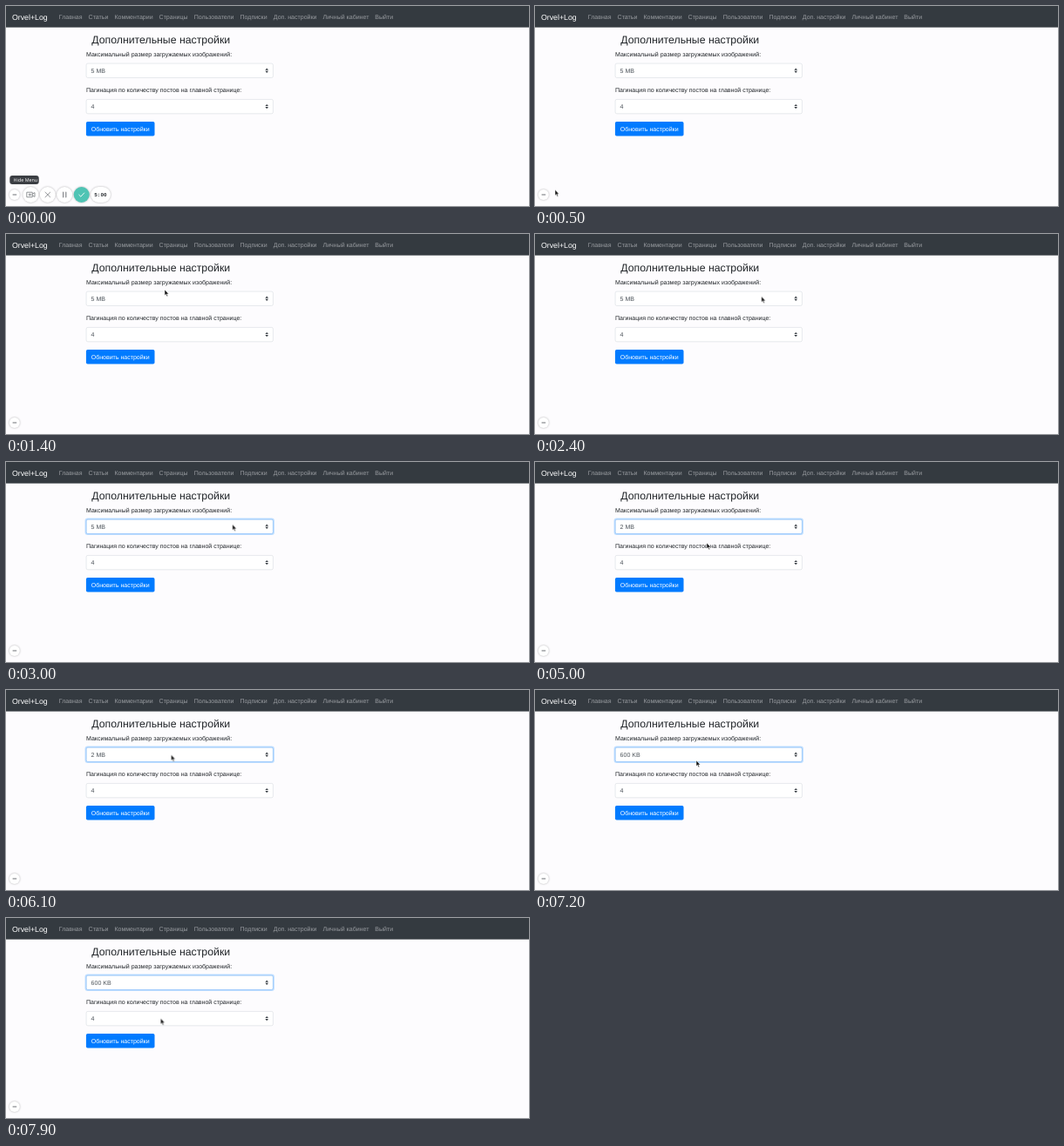
An HTML page that plays this animation: 600 by 230 pixels, repeating every 8 s.

```html
<!DOCTYPE html>
<html lang="ru">
<head>
<meta charset="utf-8">
<title>Дополнительные настройки</title>
<style>
  html, body { margin: 0; width: 100%; height: 100%; overflow: hidden; background: #fdfcfe; }
  svg { display: block; width: 100%; height: 100%; }
  text { font: 7.03px "Liberation Sans", Arial, sans-serif; fill: #212529; text-rendering: geometricPrecision; }
  .brand { font-size: 8.78px; fill: #fff; }
  .nav text { fill: #999ca0; }
  .title { font-size: 12.3px; }
  .field { fill: #fff; stroke: #ced4da; stroke-width: .5; }
  .value { fill: #495057; }
  .light { fill: #fff; }

  .loop, .menu, .cursor { animation: 8s step-end infinite; }
  .menu { animation-name: collapse; }
  .cursor { animation-name: travel; }
  .focus { animation-name: focus; }
  .v1 { animation-name: v1; }
  .v2 { animation-name: v2; }
  .v3 { animation-name: v3; }
  .v4 { animation-name: v4; }

  .round { fill: #fff; filter: drop-shadow(0 .6px 1px rgba(0, 0, 0, .3)); }
  .done { fill: #4fc4b4; }
  .icon { fill: none; stroke: #85888c; stroke-width: .9; stroke-linecap: round; stroke-linejoin: round; }
  .tip { font: 5.4px "Open Sans", "Noto Sans", sans-serif; fill: #fff; }
  .timer { font: bold 6px "Liberation Mono", monospace; fill: #33373b; }

  @keyframes collapse {
    0% { opacity: 1; transform: none; animation-timing-function: steps(4, end); }
    5%, 100% { opacity: 0; transform: translateX(-28px); }
  }
  @keyframes focus {
    0% { opacity: 0; }
    31.25% { opacity: .6; }
    32.5%, 100% { opacity: 1; }
  }
  @keyframes v1 { 0% { opacity: 1; } 43.75%, 100% { opacity: 0; } }
  @keyframes v2 { 0% { opacity: 0; } 43.75% { opacity: 1; } 60%, 100% { opacity: 0; } }
  @keyframes v3 { 0% { opacity: 0; } 60% { opacity: 1; } 90%, 100% { opacity: 0; } }
  @keyframes v4 { 0% { opacity: 0; } 90%, 100% { opacity: 1; } }

  /* Each leg advances once per 100 ms */
  @keyframes travel {
    0% { transform: translate(12px, 214px); opacity: 0; }
    5% { transform: translate(18px, 213px); opacity: 1; }
    6.25% { transform: translate(23px, 211.3px); opacity: 1; animation-timing-function: steps(4, end); }
    11.25% { transform: translate(130px, 193px); animation-timing-function: steps(5, end); }
    17.5% { transform: translate(182px, 64px); animation-timing-function: steps(4, end); }
    22.5% { transform: translate(235px, 67px); animation-timing-function: steps(6, end); }
    30%, 40% { transform: translate(259.7px, 71.7px); animation-timing-function: steps(2, end); }
    42.5% { transform: translate(236px, 84px); }
    43.75%, 55% { transform: translate(213.6px, 71.5px); animation-timing-function: steps(4, end); }
    60%, 71.25% { transform: translate(197px, 93px); animation-timing-function: steps(4, end); }
    76.25%, 86.25% { transform: translate(189.5px, 74.5px); animation-timing-function: steps(3, end); }
    90%, 91.25% { transform: translate(185px, 81px); animation-timing-function: steps(6, end); }
    98.75%, 100% { transform: translate(177.4px, 115.4px); opacity: 1; }
  }
</style>
</head>
<body>
<svg viewBox="0 0 600 230" preserveAspectRatio="none">
  <defs>
    <g id="carets" fill="#343a40">
      <path d="M-1.8-.5 0-2.7 1.8-.5Z"/>
      <path d="M-1.8 .5 0 2.7 1.8 .5Z"/>
    </g>
  </defs>

  <rect width="600" height="24.6" fill="#343a40"/>
  <text class="brand" x="7" y="15.5">Orvel+Log</text>
  <g class="nav">
    <text x="60.8" y="14.7">Главная</text>
    <text x="94.6" y="14.7">Статьи</text>
    <text x="124.4" y="14.7">Комментарии</text>
    <text x="175.6" y="14.7">Страницы</text>
    <text x="215.7" y="14.7">Пользователи</text>
    <text x="268.5" y="14.7">Подписки</text>
    <text x="306.8" y="14.7">Доп. настройки</text>
    <text x="363.6" y="14.7">Личный кабинет</text>
    <text x="423.3" y="14.7">Выйти</text>
  </g>

  <text class="title" x="98.2" y="43.2">Дополнительные настройки</text>
  <text x="92" y="57.5">Максимальный размер загружаемых изображений:</text>
  <rect class="field" x="92.1" y="66.1" width="214.3" height="16.4" rx="1.8"/>
  <g class="loop focus">
    <rect x="91.3" y="65.3" width="215.9" height="18" rx="2.5" fill="none" stroke="#bfdeff" stroke-width="1.5"/>
    <rect x="92.1" y="66.1" width="214.3" height="16.4" rx="1.8" fill="none" stroke="#80bdff" stroke-width=".6"/>
  </g>
  <text class="value loop v1" x="97.6" y="76.8">5 MB</text>
  <text class="value loop v2" x="97.6" y="76.8">1 MB</text>
  <text class="value loop v3" x="97.6" y="76.8">2 MB</text>
  <text class="value loop v4" x="97.6" y="76.8">600 KB</text>
  <use href="#carets" x="299.2" y="74.3"/>

  <text x="92" y="98.9">Пагинация по количеству постов на главной странице:</text>
  <rect class="field" x="92.1" y="107.4" width="214.3" height="16.4" rx="1.8"/>
  <text class="value" x="97.6" y="118.1">4</text>
  <use href="#carets" x="299.2" y="115.6"/>

  <rect x="91.9" y="132.9" width="78.6" height="16.7" rx="1.8" fill="#007bff"/>
  <text class="light" x="97.7" y="143.7">Обновить настройки</text>

  <g class="menu">
    <rect x="4.3" y="195" width="33.4" height="10" rx="3" fill="#3b3e43"/>
    <text class="tip" x="8.6" y="202">Hide Menu</text>
    <circle class="round" cx="28.4" cy="217" r="9"/>
    <circle class="round" cx="47.8" cy="217" r="9"/>
    <circle class="round" cx="67.2" cy="217" r="9"/>
    <circle class="round done" cx="86.7" cy="217" r="9"/>
    <rect class="round" x="97.2" y="208" width="22.8" height="18" rx="9"/>
    <g class="icon">
      <path d="M24.2 214.2h6v5.6h-6ZM30.2 216.2l2.8-1.6v4.8l-2.8-1.6"/>
      <circle cx="27.2" cy="217" r="1"/>
      <path d="M45 214.2l5.6 5.6M50.6 214.2l-5.6 5.6"/>
      <path d="M65.6 214.2v5.6M68.8 214.2v5.6" stroke-width="1.2"/>
      <path d="M83.8 217.2l2 2 3.9-4.2" stroke="#fff"/>
    </g>
    <text class="timer" x="101.2" y="219">5:00</text>
  </g>
  <circle class="round" cx="9.8" cy="217" r="6"/>
  <path d="M7.6 217h4.6" stroke="#6d7175" stroke-width="1"/>

  <path class="cursor" d="M0 0V6.6L1.5 5.3 2.5 7.7 3.6 7.2 2.6 4.9H4.6Z" fill="#111" stroke="#fff" stroke-width=".5" stroke-linejoin="round"/>
</svg>
</body>
</html>
```
